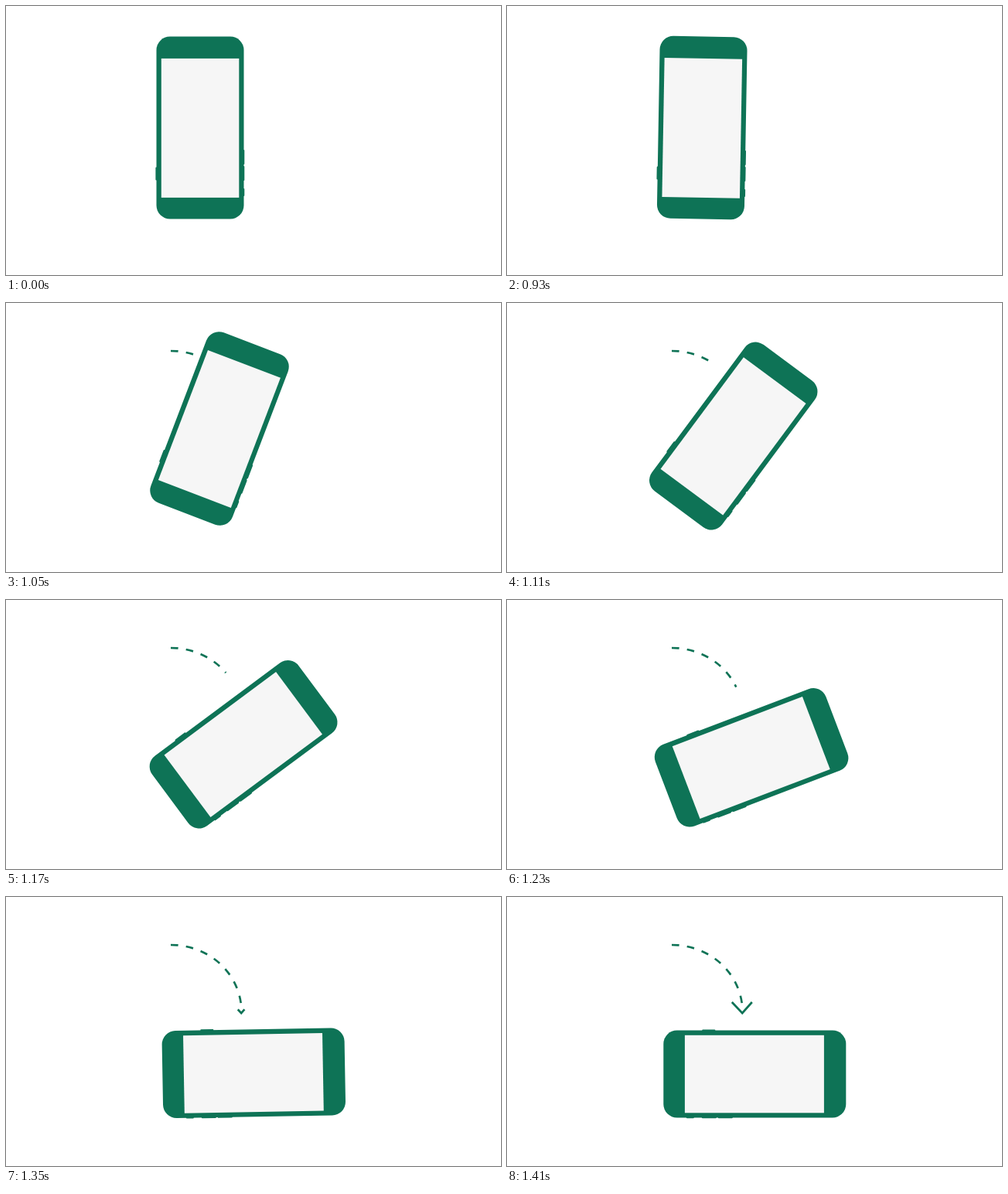
Write an HTML page with a canvas that moves like this. It is 640 px wide and 348 px high and loops after 2730 ms.

```html
<!DOCTYPE html>
<html lang="en">
<head>
<meta charset="utf-8">
<title>Rotate your phone</title>
<style>
  html, body { margin: 0; width: 100%; height: 100%; overflow: hidden; background: #fff; }
  canvas { display: block; width: 640px; height: 348px; }
</style>
</head>
<body>
<canvas id="stage" width="640" height="348"></canvas>
<script>
const ctx = document.getElementById('stage').getContext('2d');
const GREEN = '#0e7356';
const SCREEN = '#f6f6f6';
const LOOP = 2730, STEP = 30, START = 900;
const DASH = 9.6, PERIOD = 19.8, TRAIL_MAX = 137;

const clamp = (v, lo, hi) => Math.min(hi, Math.max(lo, v));
const smooth = u => u * u * (3 - 2 * u);

function drawPhone(turn) {
  ctx.save();
  // swing around a pivot below the phone's centre
  ctx.translate(249.9, 227.9);
  ctx.rotate(turn * Math.PI / 2);
  ctx.translate(1.1, -70.4);

  ctx.fillStyle = GREEN;
  ctx.beginPath();
  ctx.roundRect(-56.5, -118, 113, 236, 17.5);
  ctx.fill();

  // side buttons
  const button = (x, y, h) => {
    ctx.beginPath();
    ctx.roundRect(x, y, 4, h, 1);
    ctx.fill();
  };
  button(-57.6, 51, 17);
  button(53.3, 28.5, 19);
  button(53.3, 49.5, 19);
  button(53.3, 78.5, 10);

  ctx.fillStyle = SCREEN;
  ctx.fillRect(-50.2, -89.6, 100.5, 180);
  ctx.restore();
}

function drawTrail(length) {
  if (length <= 0) return;
  // only the dashes that fit in the revealed length
  const pattern = [];
  for (let at = 0; at < length; at += PERIOD) {
    pattern.push(Math.min(DASH, length - at), PERIOD - DASH);
  }
  pattern[pattern.length - 1] = 1000;
  ctx.setLineDash(pattern);
  ctx.beginPath();
  ctx.moveTo(213, 62);
  ctx.bezierCurveTo(264, 62, 304, 100.5, 304.5, 148);
  ctx.stroke();
  ctx.setLineDash([]);
}

function drawHead(grow) {
  if (grow <= 0) return;
  const x = 304.2, y = 150.2;
  ctx.beginPath();
  ctx.moveTo(x - 13.4 * grow, y - 14.2 * grow);
  ctx.lineTo(x, y);
  ctx.lineTo(x + 12.6 * grow, y - 14.2 * grow);
  ctx.stroke();
}

function draw(time) {
  const step = clamp(Math.floor((time - START) / STEP), 0, 17);
  ctx.fillStyle = '#fff';
  ctx.fillRect(0, 0, 640, 348);
  drawPhone(smooth(Math.min(step / 16, 1)));
  ctx.strokeStyle = GREEN;
  ctx.lineWidth = 2.7;
  drawTrail(clamp(11.1 * (step - 1.75), 0, TRAIL_MAX));
  drawHead(clamp((step - 14) / 3, 0, 1));
}

const origin = performance.now();
function tick() {
  draw((performance.now() - origin) % LOOP);
  requestAnimationFrame(tick);
}
tick();
</script>
</body>
</html>
```
